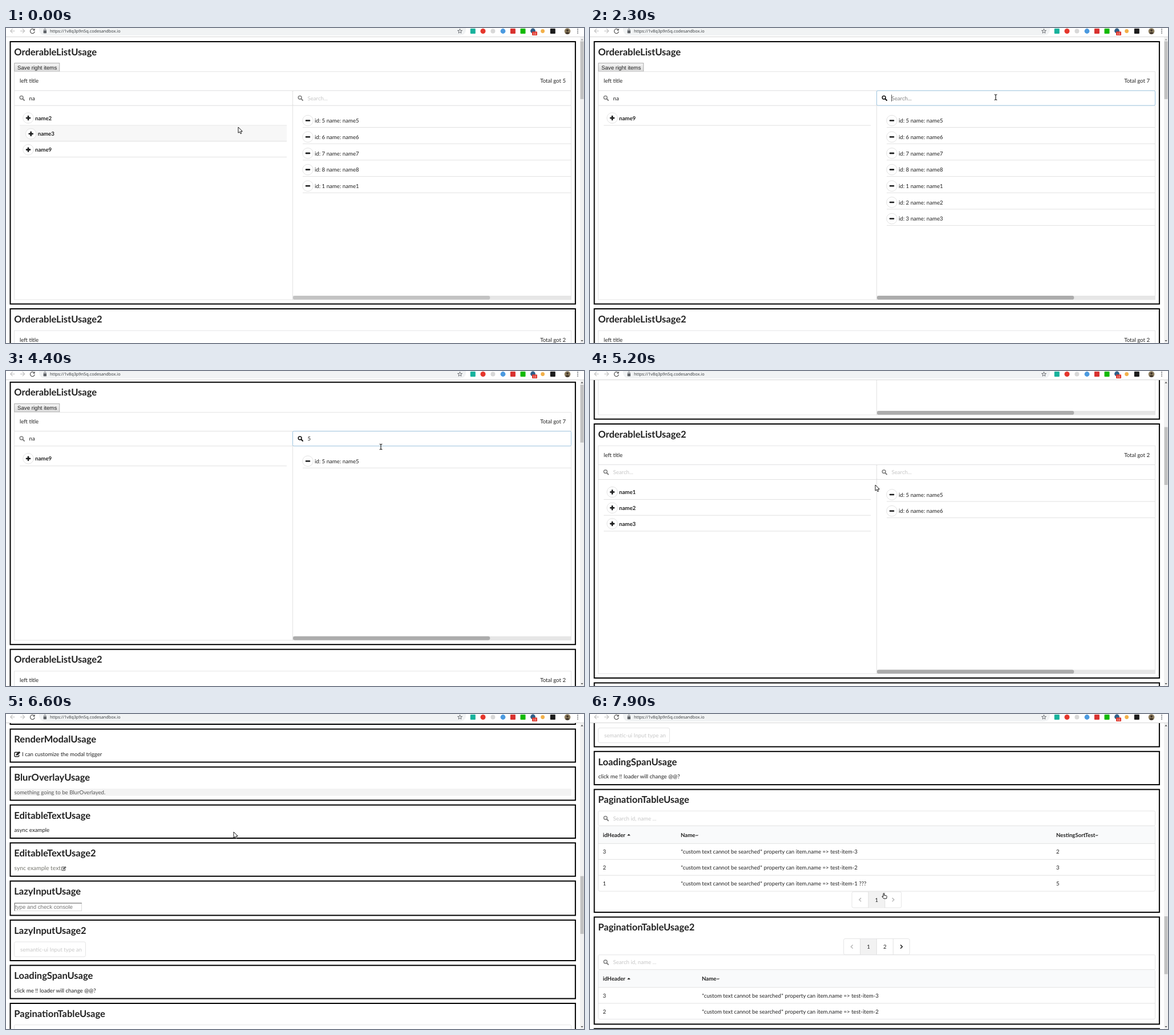
An HTML page that plays this animation: 1013 px wide and 553 px high, repeating every 8 s.

```html
<!DOCTYPE html>
<html lang="en">
<head>
<meta charset="utf-8">
<title>List components demo</title>
<style>
html, body { margin: 0; width: 100%; height: 100%; overflow: hidden; background: #fff; }
svg { display: block; width: 1013px; height: 553px; }
text { font: 9.66px Lato, sans-serif; fill: #212121; text-rendering: geometricPrecision; white-space: pre; }
.b { font-weight: 700; }
.h { font-size: 16.5px; font-weight: 700; }
.ui { font-family: "Liberation Sans", Arial, sans-serif; }
.hint { fill: #c7c7c7; }
.hint.on { fill: #848484; }
.url { font: 7.3px "Noto Sans", sans-serif; fill: #3c4043; }
.sync { font-size: 10.35px; fill: #77776f; }
.badge { font-size: 5px; fill: #fff; }
.box { fill: #fff; stroke: #dededf; stroke-width: .8; }
.frame { fill: #fff; stroke: #000; stroke-width: 2; }
.line { stroke: #dedede; stroke-width: .9; }
</style>
</head>
<body>
<svg viewBox="0 0 1013 553" xmlns="http://www.w3.org/2000/svg">
  <g id="page"><g id="live"></g><g id="rest"></g></g>
  <g id="bar"></g>
  <g id="scroll"></g>
  <g id="pointer"></g>
</svg>
<script>
const LOOP = 8000;
const $ = id => document.getElementById(id);

// Drawing helpers: y is the optical centre of a text line.
const text = (x, y, s, cls = '', more = '') =>
  `<text x="${x}" y="${y + 3.6}" class="${cls}" ${more}>${s}</text>`;
const rect = (x, y, w, h, more = 'class="box"') =>
  `<rect x="${x}" y="${y}" width="${w}" height="${h}" ${more}/>`;
const line = (x1, y1, x2, y2) =>
  `<line class="line" x1="${x1}" y1="${y1}" x2="${x2}" y2="${y2}"/>`;
const path = (d, fill, more = '') => `<path d="${d}" fill="${fill}" ${more}/>`;
const stroke = (d, color, width, more = '') =>
  path(d, 'none', `stroke="${color}" stroke-width="${width}" ${more}`);
const dot = (x, y, r, fill, more = '') =>
  `<circle cx="${x}" cy="${y}" r="${r}" fill="${fill}" ${more}/>`;
const place = (x, y, s, scale = 1) =>
  `<g transform="translate(${x} ${y}) scale(${scale})">${s}</g>`;

const lens = (x, y, color = '#808080') => place(x, y,
  stroke('M1.3 1.3L4 4', color, 2, 'stroke-linecap="round"') +
  dot(-.9, -.9, 2.9, 'none', `stroke="${color}" stroke-width="1.5"`));
const pencil = (x, y, color, scale = 1) => place(x, y,
  stroke('M1.5 -3.3H-3.6Q-4.6 -3.3 -4.6 -2.3V3.2Q-4.6 4.2 -3.6 4.2H2Q3 4.2 3 3.2V1', color, 1.4) +
  path('M-2 2.2L-1.7 -.2 3.3 -5 5.6 -2.7 .6 2Z', color), scale);
const chevron = (x, y, dir, color) =>
  stroke(`M${x - 1.6 * dir} ${y - 3.2}L${x + 1.6 * dir} ${y}L${x - 1.6 * dir} ${y + 3.2}`, color, 1.6);
const knob = (x, y, plus) =>
  dot(x, y, 9.3, '#fff', 'stroke="#dedede" stroke-width=".9"') +
  rect(x - 4.2, y - 1.3, 8.4, 2.6, 'rx=".8" fill="#1b1c1d"') +
  (plus ? rect(x - 1.3, y - 4.2, 2.6, 8.4, 'rx=".8" fill="#1b1c1d"') : '');

const section = (top, height, title, body = '') =>
  rect(7.5, top, 990.4, height, 'class="frame"') +
  `<text x="14.3" y="${top + 23.8}" class="h">${title}</text>` + body;

function search(x, y, w, value, hint, focus) {
  return rect(x, y, w, 26, `class="box" rx="2" ${focus ? 'style="stroke:#85b7d9"' : ''}`) +
    lens(x + 13.5, y + 13, focus ? '#111' : undefined) +
    text(x + 26, y + 13, value || hint, value ? '' : 'hint' + (focus ? ' on' : '')) +
    (focus && !value ? rect(x + 25.8, y + 7, .8, 12, 'fill="#222"') : '');
}

const itemLabel = id => `id: ${id} name: name${id}`;

function leftRow(id, i, hover) {
  const y = 158 + 27.8 * i, dx = hover ? 4.7 : 0;
  return (hover ? rect(24.5, y - 14, 467.5, 27.5, 'fill="#f7f7f7"') : '') +
    line(24, y + 13, 492, y + 13) +
    knob(39 + dx, y, true) + text(51 + dx, y, 'name' + id, 'b');
}

function rightRow(id, i, owner) {
  const y = 162.5 + 28.7 * i;
  return line(520, y + 12, 990, y + 12) + knob(529, y) +
    (owner ? text(541, y, owner, 'b') + path(`M590.4 ${y - 1.2}h5l-2.5 2.8z`, '#212121') : '') +
    text(owner ? 597.3 : 541, y, itemLabel(id));
}

function listSection(top, title, o) {
  const shift = top - 24 - (o.button ? 0 : 14.5);
  const button = o.button
    ? rect(14.8, 61.7, 79, 14.6, 'fill="url(#btn)" stroke="#999" stroke-width=".8"') +
      text(20, 69, 'Save right items', 'ui') : '';
  const body = button + rect(14.5, 76.7, 976, 33.3) +
    text(24, 92.5, 'left title') +
    text(981, 92.5, 'Total got ' + o.total, '', 'text-anchor="end"') +
    rect(14.5, 136, 488, 341) + rect(502.5, 136, 488, 341) +
    search(14.5, 110, 488, o.leftQuery, 'Search...') +
    search(502.5, 110, 488, o.rightQuery, 'Search...', o.focus) +
    o.left.map((id, i) => leftRow(id, i, i === o.hover)).join('') +
    o.right.map((id, i) => rightRow(id, i, o.owner)).join('') +
    rect(503, 470, 487.3, 6.8, 'fill="#e6e6e6"') +
    rect(503, 470, 345.3, 6.8, `rx="3.4" fill="${o.inactive ? '#c3c3c3' : '#acacac'}"`);
  return section(top, o.button ? 460.5 : 446, title, place(0, shift, body));
}

function pager(x, y, pages, more) {
  const cell = 28.9, n = pages + 2, w = cell * n, mid = y + 14;
  let s = rect(x, y, w, 28, 'class="box" rx="2.5"') +
    rect(x + cell, y + .4, cell, 27.2, 'fill="#f2f2f2"');
  for (let i = 1; i < n; i++) s += line(x + cell * i, y, x + cell * i, y + 28);
  for (let i = 1; i <= pages; i++)
    s += text(x + cell * (i + .5), mid, i, '', 'text-anchor="middle"');
  return s + chevron(x + cell / 2, mid, -1, '#bcbcbc') +
    chevron(x + w - cell / 2, mid, 1, more ? '#212121' : '#bcbcbc');
}

function table(y, cols, rows) {
  const h = 31 + 27.9 * rows.length;
  const heads = ['idHeader', 'Name~', 'NestingSortTest~'];
  let s = rect(14.5, y, 976, h, 'class="box" rx="2.5"') +
    rect(14.9, y + .4, 975.2, 30.4, 'fill="#f9fafb"') +
    path(`M65.2 ${y + 17}h5.6l-2.8 -3z`, '#212121');
  cols.forEach((x, c) => {
    s += text(x, y + 15.6, heads[c], 'b');
    rows.forEach((r, i) => s += text(x, y + 45 + 27.9 * i, r[c]));
  });
  rows.forEach((_, i) => s += line(14.5, y + 31 + 27.9 * i, 990.5, y + 31 + 27.9 * i));
  return s;
}

const tableRow = (id, nest, tail = '') =>
  [id, `*custom text cannot be searched* property can item.name => test-item-${id}${tail}`, nest];

function drawRest() {
  const note = (top, s) => text(14.5, top + 44, s);
  const all = [tableRow(3, 2), tableRow(2, 3), tableRow(1, 5, ' ???')];
  const lists = { left: [1, 2, 3] };
  const edit2 = 1616.3, lazy = 1683.3, lazy2 = 1751.8, pag = 1898, pag2 = 2122;
  $('rest').innerHTML =
    listSection(493, 'OrderableListUsage2', { ...lists, total: 2, right: [5, 6] }) +
    listSection(947.5, 'OrderableListUsage3',
      { ...lists, total: 5, right: [5, 6, 7, 8, 9], button: true, owner: 'Clara Moss' }) +
    section(1416.5, 58, 'RenderModalUsage',
      pencil(19.6, 1460.5, '#212121') + text(28, 1460.5, 'I can customize the modal trigger')) +
    section(1483.1, 58.3, 'BlurOverlayUsage',
      rect(14.5, 1521, 976, 12.7, 'fill="#f3f3f3"') +
      text(14.5, 1527.1, 'something going to be BlurOverlayed.', '', 'filter="url(#blur)" opacity=".75"')) +
    section(1549.7, 58.3, 'EditableTextUsage', note(1549.7, 'async example')) +
    section(edit2, 58.5, 'EditableTextUsage2',
      text(14.5, edit2 + 44.5, 'sync example text', 'sync') + pencil(101.3, edit2 + 45, '#666', .8)) +
    section(lazy, 60.2, 'LazyInputUsage',
      rect(15, lazy + 38.5, 117.5, 13.8, 'fill="#fff" stroke="#dcdcdc" stroke-width="1"') +
      stroke(`M15.2 ${lazy + 52.5}V${lazy + 38.8}H132.8`, '#858585', 1.3) +
      text(16, lazy + 45.3, 'type and check console', 'ui', 'style="fill:#757575"')) +
    section(lazy2, 71.2, 'LazyInputUsage2',
      rect(14.5, lazy2 + 38.2, 125, 26, 'class="box" rx="2.5"') +
      text(25, lazy2 + 51.2, 'semantic-ui Input type an', 'hint')) +
    section(1831.3, 58.3, 'LoadingSpanUsage', note(1831.3, 'click me !! loader will change @@?')) +
    section(pag, 215.6, 'PaginationTableUsage',
      search(14.5, pag + 37.7, 976, '', 'Search id, name ...') +
      table(pag + 63.9, [22.5, 159, 817], all) + pager(459, pag + 179.6, 1)) +
    section(pag2, 188, 'PaginationTableUsage2',
      pager(444.6, pag2 + 38, 2, true) +
      search(14.5, pag2 + 66.3, 976, '', 'Search id, name ...') +
      table(pag2 + 92.5, [22.5, 196], all.slice(0, 2))) +
    section(2318, 60, '');
}

function drawBar() {
  const arrow = (x, dir, c) => stroke(
    `M${x - 4 * dir} 5.2H${x + 3.5 * dir}M${x} 1.5L${x + 3.7 * dir} 5.2L${x} 8.9`, c, 1.1);
  const square = (x, c) => rect(x - 4.5, 1, 9, 9, `rx="1" fill="${c}"`);
  let star = '';
  for (let i = 0; i < 10; i++) {
    const r = i % 2 ? 1.7 : 4.2, a = Math.PI * (i / 5 - .5);
    star += `${i ? 'L' : 'M'}${795.5 + r * Math.cos(a)} ${5.7 + r * Math.sin(a)}`;
  }
  $('bar').innerHTML =
    rect(0, 0, 1013, 16, 'fill="#fff"') + rect(0, 15, 1013, .9, 'fill="#d3d3d3"') +
    rect(58, -12, 748, 25.3, 'rx="10" fill="#f1f3f4"') +
    arrow(11.5, -1, '#bdbdbd') + arrow(29, 1, '#bdbdbd') +
    stroke('M49.4 3.2A3.9 3.9 0 1 0 50.2 6.2', '#555', 1.2) + path('M50.6 .8V4.6H46.8Z', '#555') +
    rect(65.6, 4.2, 5.4, 5, 'rx=".6" fill="#5f6368"') +
    stroke('M66.8 4.5V3a1.5 1.5 0 0 1 3 0V4.5', '#5f6368', .9) +
    text(77, 4.4, 'https://1v8q3p9n5q.codesandbox.io', 'url') +
    stroke(star + 'Z', '#5f6368', .9) +
    square(818.3, '#17b29c') + dot(836, 5.5, 4.5, '#e5362c') + dot(853.4, 5.5, 4, '#d8d8d8') +
    dot(871, 5.5, 4.4, '#4b9ae0') + square(888.4, '#d8322f') + square(906, '#12b900') +
    dot(923.5, 5, 4.4, '#2f5f88') + rect(922, 6.3, 9, 6.8, 'rx="1" fill="#e0382e"') +
    text(926.5, 7.9, '15', 'badge', 'text-anchor="middle"') +
    dot(940.6, 5.5, 3.4, '#f2b04a') + square(958.3, '#1c1c1c') +
    dot(984, 5.5, 5.3, '#8a7a5c') + dot(984, 4.2, 1.9, '#3f3327') +
    path('M980.2 9.2Q984 4.6 987.8 9.2Q984 12.4 980.2 9.2Z', '#3f3327') +
    [2.2, 5.5, 8.8].map(y => dot(1002, y, .95, '#5f6368')).join('');
}

const pointers = {
  arrow: path('M0 0V10.2L2.4 8.1 4.1 11.7 5.8 10.9 4.2 7.4H7.3Z', '#fff',
    'stroke="#000" stroke-width=".9" stroke-linejoin="round"'),
  beam: stroke('M-2.4 -4.8Q0 -4.8 0 -3.6Q0 -4.8 2.4 -4.8M0 -3.6V3.6M-2.4 4.8Q0 4.8 0 3.6Q0 4.8 2.4 4.8',
    '#111', 1.1),
  hand: path('M-1 .2Q0 -.8 .8 .2V3.4L4.4 4Q5.4 4.3 5.3 5.4L4.7 9H-.2L-3 5.8Q-3.2 4.6 -2 4.8L-1 5.6Z',
    '#fff', 'stroke="#000" stroke-width=".9" stroke-linejoin="round"')
};

// Stepped tracks: each entry holds until the next one.
const scrolls = [[0, 0], [4400, 4.3], [4900, 187], [5200, 400], [5900, 931.5], [6300, 1233],
  [6600, 1390], [7000, 1592], [7300, 1658.8], [7900, 1765.5]];
const stops = [[2300, 711, 121.5, 'beam'], [4100], [4400, 657, 133, 'beam'],
  [4900, 560, 178, 'arrow'], [5200, 500, 200, 'arrow'], [5900, 461, 211, 'arrow'],
  [6300, 399, 207, 'arrow'], [7900, 515, 315, 'hand']];
const held = (track, t) => track.filter(k => k[0] <= t).pop();

const mix = (a, b, k) => a + (b - a) * k;
const ease = k => k * k * (3 - 2 * k);
// Progress in ticks of 100 ms, reaching 1 at the end time.
const ticks = (t, start, end) => {
  const k = (Math.floor(t / 100) * 100 - start + 100) / (end - start + 100);
  return ease(Math.max(0, Math.min(1, k)));
};

function pointerAt(t) {
  const stop = held(stops, t);
  if (stop) return { x: stop[1], y: stop[2], kind: stop[3] };
  const go = ticks(t, 200, 700), back = ticks(t, 1500, 2300);
  const x = mix(mix(407, 41, go), 711, back), y = mix(mix(174, 155, go), 121.5, back);
  const kind = x < 50 ? 'hand' : x > 503 && y < 136 ? 'beam' : 'arrow';
  return { x, y, kind };
}

function listState(t, p) {
  const moved = t < 900 ? 0 : t < 1500 ? 1 : 2;
  const over = t < 2300 && p.x > 24 && p.x < 492 && p.y > 144;
  const typed = t >= 3500;
  return {
    button: true, total: 5 + moved, leftQuery: 'na', rightQuery: typed ? '5' : '',
    focus: t >= 2300, inactive: t < 900,
    hover: over ? Math.floor((p.y - 144) / 27.5) : -1,
    left: [2, 3, 9].slice(moved),
    right: typed ? [5] : [5, 6, 7, 8, 1, 2, 3].slice(0, 5 + moved)
  };
}

let lastKey = '';
function draw(t) {
  const p = pointerAt(t), state = listState(t, p), key = JSON.stringify(state);
  if (key !== lastKey) {
    $('live').innerHTML = listSection(24, 'OrderableListUsage', state);
    lastKey = key;
  }
  const y = held(scrolls, t)[1];
  $('page').setAttribute('transform', `translate(0 ${-y})`);
  $('scroll').innerHTML = rect(1006, 16, 7, 537, 'fill="#f1f1f1"') +
    rect(1006.6, 23.3 + y / 5.32, 5.8, 101.5, 'fill="#c1c1c1"') +
    path('M1007.4 21.4h4.2l-2.1 -2.6z', y ? '#505050' : '#a3a3a3') +
    path('M1007.4 548h4.2l-2.1 2.6z', '#505050');
  $('pointer').innerHTML = p.kind ? place(p.x, p.y, pointers[p.kind]) : '';
}

document.querySelector('svg').insertAdjacentHTML('afterbegin', `<defs>
  <linearGradient id="btn" x2="0" y2="1"><stop stop-color="#f4f4f4"/><stop offset="1" stop-color="#dcdcdc"/></linearGradient>
  <filter id="blur"><feGaussianBlur stdDeviation=".75"/></filter></defs>`);
drawBar();
drawRest();
const start = performance.now();
function tick() {
  draw((performance.now() - start) % LOOP);
  requestAnimationFrame(tick);
}
tick();
</script>
</body>
</html>
```
